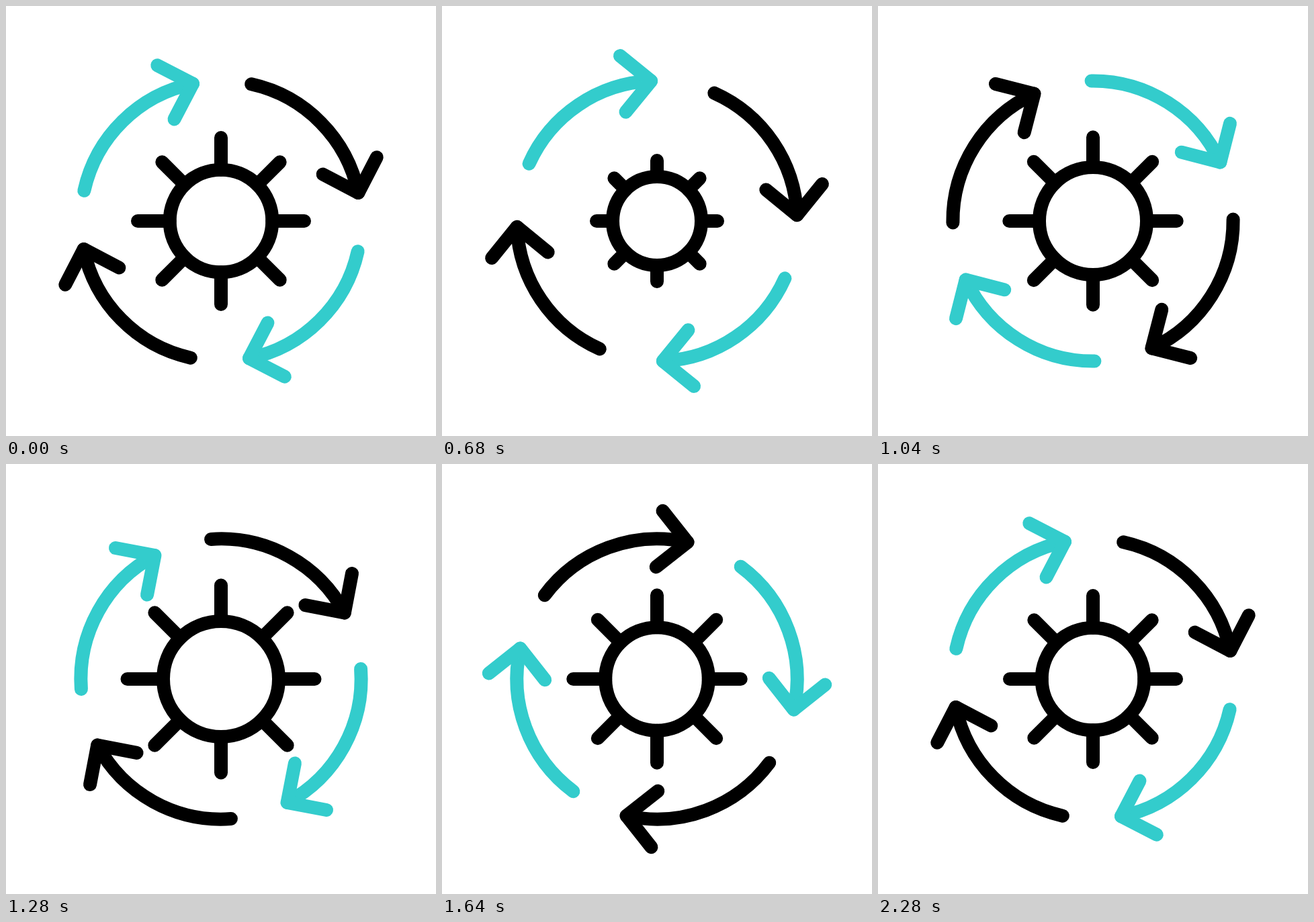
An HTML page with a canvas for the animation above (2.32 s loop, 640 by 640 pixels).

```html
<!DOCTYPE html>
<html lang="en">
<head>
<meta charset="utf-8">
<title>Sun cycle</title>
<style>
  html, body { margin: 0; width: 100%; height: 100%; overflow: hidden; background: #fff; }
  canvas { display: block; width: 100vmin; height: 100vmin; }
</style>
</head>
<body>
<canvas id="stage" width="640" height="640"></canvas>
<script>
const ctx = document.getElementById('stage').getContext('2d');
const LOOP = 2320, STEP = 40;
const BLACK = '#000', TEAL = '#33cccc';
const RADIUS = 208.6, TAIL = 192.5, TIP = 258.4, BARB = 59.5;

const rad = deg => deg * Math.PI / 180;
const polar = (r, deg) => [r * Math.cos(rad(deg)), r * Math.sin(rad(deg))];

// Symmetric cubic-bezier(A, 0, 1 - A, 1), solved by bisection
const A = 0.53;
function ease(x) {
  if (x <= 0) return 0;
  if (x >= 1) return 1;
  let lo = 0, hi = 1;
  for (let i = 0; i < 30; i++) {
    const s = (lo + hi) / 2, u = 1 - s;
    const bx = 3 * A * s * u * u + 3 * (1 - A) * s * s * u + s * s * s;
    if (bx < x) lo = s; else hi = s;
  }
  return lo * lo * (3 - 2 * lo);
}

// keys: [time, value] pairs, eased between neighbours
function track(t, keys) {
  let value = keys[0][1];
  for (let i = 1; i < keys.length; i++) {
    const [t0, v0] = keys[i - 1], [t1, v1] = keys[i];
    if (t >= t0) value = v0 + (v1 - v0) * ease((t - t0) / (t1 - t0));
  }
  return value;
}

const SPIN = [[400, 0], [2240, 360]];
const PULL = [[40, 0], [680, 2.45], [1080, 0]];
const RING = [[40, 76.3], [680, 66], [1280, 86], [1720, 76.3]];
const RAY = [[40, 124], [680, 90], [1280, 139.5], [1720, 124]];

function arrow(turn, pull, color) {
  ctx.save();
  ctx.rotate(rad(turn));
  ctx.strokeStyle = color;

  ctx.beginPath();
  ctx.arc(0, 0, RADIUS, rad(TAIL), rad(TIP - pull));
  ctx.stroke();

  // The head keeps its own angle while it slides along the arc
  const [x, y] = polar(RADIUS, TIP - pull);
  const [ax, ay] = polar(BARB, 207.4);
  const [bx, by] = polar(BARB, 117.6);
  ctx.beginPath();
  ctx.moveTo(x + ax, y + ay);
  ctx.lineTo(x, y);
  ctx.lineTo(x + bx, y + by);
  ctx.stroke();
  ctx.restore();
}

function sun(ring, ray) {
  ctx.strokeStyle = BLACK;
  ctx.beginPath();
  ctx.arc(0, 0, ring, 0, Math.PI * 2);
  ctx.stroke();
  ctx.beginPath();
  for (let deg = 0; deg < 360; deg += 45) {
    ctx.moveTo(...polar(ring, deg));
    ctx.lineTo(...polar(ray, deg));
  }
  ctx.stroke();
}

function draw(t) {
  ctx.setTransform(1, 0, 0, 1, 0, 0);
  ctx.fillStyle = '#fff';
  ctx.fillRect(0, 0, 640, 640);
  ctx.translate(320, 320);
  ctx.lineWidth = 20;
  ctx.lineCap = ctx.lineJoin = 'round';

  const spin = track(t, SPIN), pull = track(t, PULL);
  for (let i = 0; i < 4; i++) arrow(spin + i * 90, pull, i % 2 ? BLACK : TEAL);
  sun(track(t, RING), track(t, RAY));
}

function frame(now) {
  draw(Math.floor((now % LOOP + 2) / STEP) * STEP % LOOP);
  requestAnimationFrame(frame);
}
draw(0);
requestAnimationFrame(frame);
</script>
</body>
</html>
```
